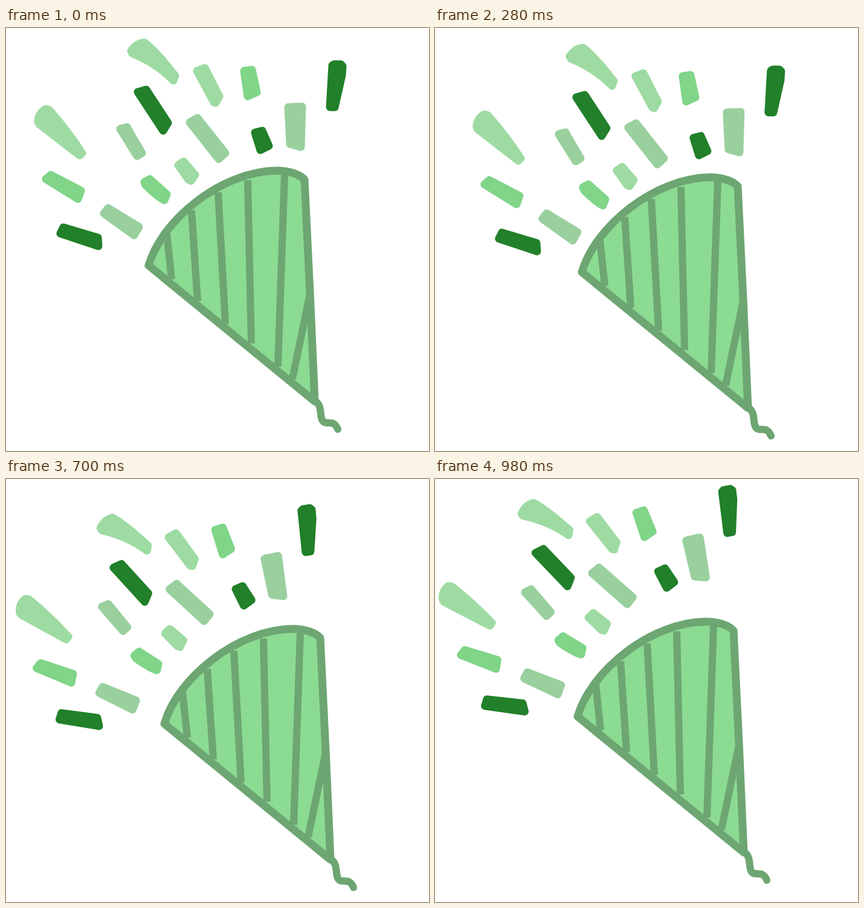
These frames come from a looping animation (700 px wide and 700 px high, 1.12 s). An HTML page:

```html
<!DOCTYPE html>
<html lang="en">
<head>
<meta charset="utf-8">
<title>Party popper</title>
<style>
  html, body { margin: 0; width: 100%; height: 100%; overflow: hidden; background: #fff; }
  svg { display: block; width: 100vw; height: 100vh; }
  #confetti path { stroke-width: 13; stroke-linejoin: round; }
  .light { fill: #9edba3; stroke: #9edba3; }
  .pale { fill: #99d09e; stroke: #99d09e; }
  .green { fill: #80d588; stroke: #80d588; }
  .dark { fill: #218029; stroke: #218029; }
  #cone { fill: none; stroke: #6da672; stroke-width: 12; stroke-linejoin: round; }
  #cone .body { fill: #8cdb92; stroke-width: 13; }
</style>
</head>
<body>
<svg viewBox="0 0 700 700">
  <g id="confetti">
    <path class="light" d="M66 134C58 138 53 146 53 155L55 159 122 211 126 207Q102 170 72 136Z
      M207 38Q216 25 229 24Q235 27 258 52L280 79 277 87Q250 59 209 42Z
      M316 71L329 66 353 113 347 124 344 123Z
      M285 227L294 221 313 243 306 253 302 251Z"/>
    <path class="pale" d="M162 307L169 298 220 329 212 343Z
      M189 167L200 164 225 207 217 212Z
      M304 156L317 149 363 207 352 217Z
      M467 131L490 130 488 197 470 192Z"/>
    <path class="green" d="M66 250L74 243 124 269 119 283Z
      M229 255L238 250 266 275 262 285Q250 279 231 260Z
      M394 71L407 69 415 106 400 113Z"/>
    <path class="dark" d="M90 340L95 330 152 347 153 361Z
      M218 106L232 102 268 157 260 170Z
      M412 173L424 170 435 195 421 202Z
      M540 62L543 60 554 60 557 63 556 78 544 131 536 131Z"/>
  </g>
  <g id="cone">
    <path class="body" d="M236 393C258 317 357 237 448 236C470 236 487 243 494 251L503 437 511 618Z"/>
    <path d="M266 340L274 416M307 302L317 452M351 272L363 490M400 252L406 522M461 242L450 560M503 440L474 580"/>
    <path stroke-linecap="round" d="M513 618C525 628 517 645 526 652C532 656 543 648 549 664"/>
  </g>
</svg>
<script>
  const STEP = 140;
  // One pose per step: cone offset, then confetti offset and turn in degrees
  const poses = [
    { cone: [0, 0], confetti: [0, 0], turn: 0 },
    { cone: [0, 0], confetti: [-20, -1], turn: 0 },
    { cone: [7, 11], confetti: [15.8, 8.7], turn: 0 },
    { cone: [20, -15], confetti: [29.7, -49.9], turn: 5.1 },
    { cone: [25, 3], confetti: [40.7, -26.9], turn: 5.1 },
    { cone: [26, 12], confetti: [-54.1, 76.5], turn: -9.1 },
    { cone: [18, -2], confetti: [-87.8, 36.3], turn: -9.1 },
    { cone: [0, 0], confetti: [-67.2, 57.3], turn: -10.4 }
  ];
  const cone = document.getElementById('cone');
  const confetti = document.getElementById('confetti');

  function draw() {
    const pose = poses[Math.floor(performance.now() / STEP) % poses.length];
    cone.setAttribute('transform', `translate(${pose.cone})`);
    confetti.setAttribute('transform', `translate(${pose.confetti}) rotate(${pose.turn})`);
    requestAnimationFrame(draw);
  }
  draw();
</script>
</body>
</html>
```
